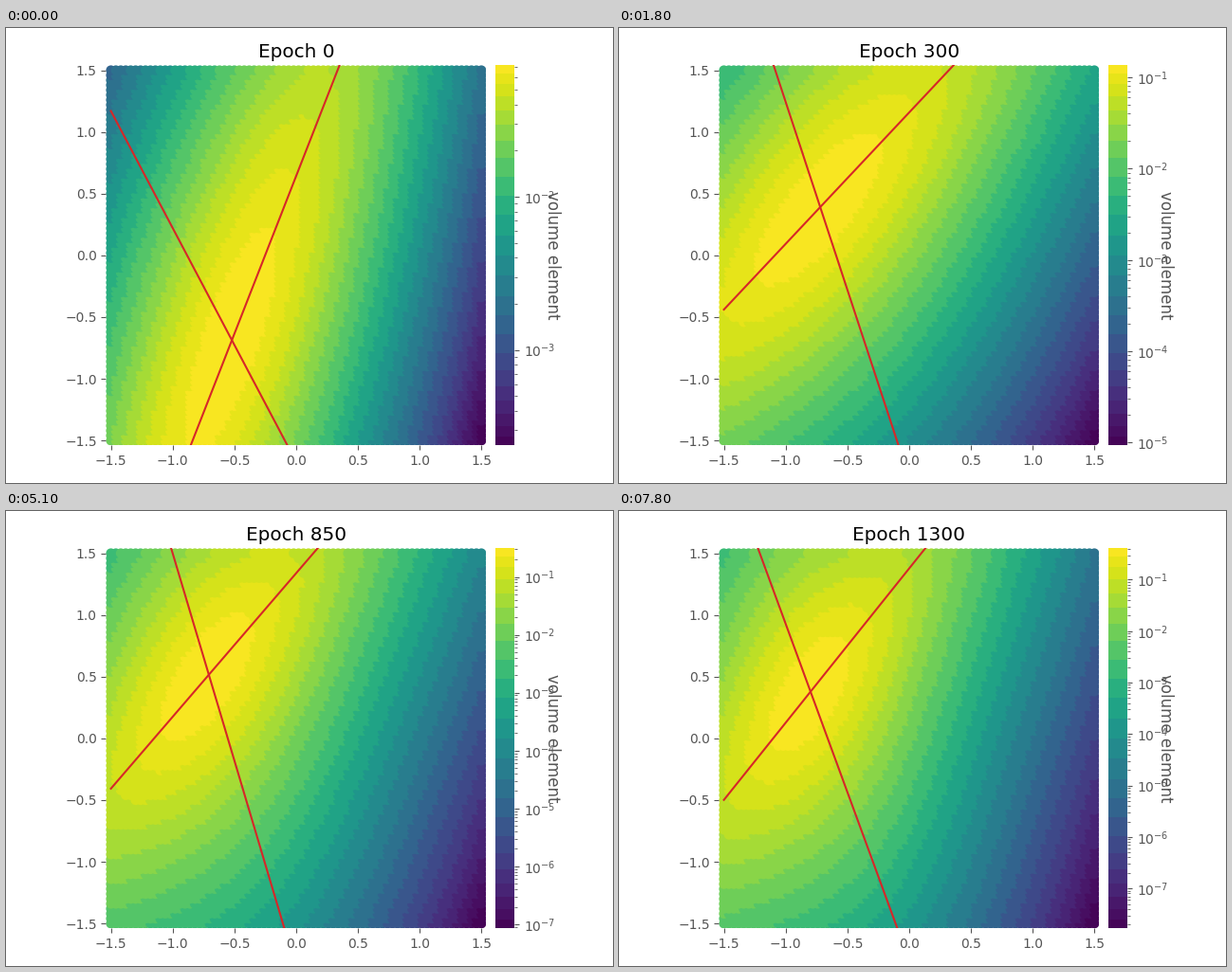
Animation, 640 px wide and 480 px high, one loop 8 s. Source, as a matplotlib script:

```python
import numpy as np
import matplotlib.pyplot as plt
from matplotlib.animation import FuncAnimation
from matplotlib.colors import ListedColormap, LogNorm

WIDTH, HEIGHT, DPI = 640, 480, 100
GREY = "#555555"
TICK_MS, HOLD_MS, LOOP_MS = 100, 300, 8000
EPOCH_STEP = 50
LIMIT = 1.54
BANDS = 24

plt.rcParams.update({
    "font.family": "DejaVu Sans", "font.size": 10,
    "axes.titlesize": 14.4, "axes.labelsize": 12,
    "axes.labelcolor": GREY, "xtick.color": GREY, "ytick.color": GREY,
})


def hidden_unit(sharpness, top, slope):
    """Weights (wx, wy, bias) of a unit whose zero line meets the top edge at x = top."""
    return sharpness / np.hypot(slope, 1) * np.array([slope, -1, LIMIT - slope * top])


def units_at(epoch):
    """Both hidden units: a fast transient followed by slow settling."""
    def decay(tau, power=1):
        return np.exp(-(epoch / tau) ** power)

    steep_top = -0.6 - 0.00048 * epoch - 1.095 * decay(277, 1.55)
    steep_bottom = -0.095 + 0.1 * np.exp(-((epoch - 130) / 110) ** 2)
    steep = hidden_unit(
        sharpness=3.3 - 3.24 * decay(584) + 0.94 * decay(124),
        top=steep_top,
        slope=2 * LIMIT / (steep_top - steep_bottom))
    rising = hidden_unit(
        sharpness=5.645 - 3.627 * decay(650) + 1.03 * decay(104),
        top=0.11 + 0.53 * decay(400) - 0.289 * decay(55),
        slope=1 + 0.25 * epoch / 1300 + 1.556 * decay(55))
    return np.array([steep, rising])


def sigmoid_slope(z):
    return 0.25 / np.cosh(z / 2) ** 2


def volume_element(units, x, y):
    density = abs(np.linalg.det(units[:, :2])) / 2
    for wx, wy, bias in units:
        density = density * sigmoid_slope(wx * x + wy * y + bias)
    return density


def banded_viridis(size=400):
    """Viridis in flat bands that narrow towards both ends."""
    u = np.linspace(0, 1, BANDS + 1)
    edges = (u + (1 - np.cos(np.pi * u)) / 2) / 2
    centers = (edges[:-1] + edges[1:]) / 2
    levels = (np.arange(size) + 0.5) / size
    return ListedColormap(plt.get_cmap("viridis")(centers[np.digitize(levels, edges) - 1]))


def pixel_axes(left, bottom, width, height):
    return fig.add_axes([left / WIDTH, bottom / HEIGHT, width / WIDTH, height / HEIGHT])


fig = plt.figure(figsize=(WIDTH / DPI, HEIGHT / DPI), dpi=DPI, facecolor="white")
ax = pixel_axes(105.4, 39.6, 401, 401)
cax = pixel_axes(516, 39.6, 20, 401)
ax.set(xlim=(-LIMIT, LIMIT), ylim=(-LIMIT, LIMIT))
ax.spines[:].set_visible(False)
ticks = np.linspace(-1.5, 1.5, 7)
ax.set_xticks(ticks)
ax.set_yticks(ticks)

side = np.linspace(-1.5, 1.5, 76)
grid_x, grid_y = (g.ravel() for g in np.meshgrid(side, side))
start = volume_element(units_at(0), grid_x, grid_y)
dots = ax.scatter(grid_x, grid_y, c=start, s=7.5 ** 2, linewidths=0,
                  cmap=banded_viridis(), norm=LogNorm(start.min(), start.max()))
ends = np.array([-1.5, 1.5])
lines = [ax.plot(ends, ends, color="tab:red", lw=1.5)[0] for _ in range(2)]
title = ax.set_title("Epoch 0")

bar = fig.colorbar(dots, cax=cax)
bar.outline.set_visible(False)
bar.set_label("volume element", rotation=270)


def draw(frame):
    epoch = frame * TICK_MS // HOLD_MS * EPOCH_STEP
    units = units_at(epoch)
    values = volume_element(units, grid_x, grid_y)
    dots.set_array(values)
    dots.set_clim(values.min(), values.max())
    for line, (wx, wy, bias) in zip(lines, units):
        line.set_ydata(-(wx * ends + bias) / wy)
    title.set_text(f"Epoch {epoch}")
    return dots, *lines, title


animation = FuncAnimation(fig, draw, frames=LOOP_MS // TICK_MS, interval=TICK_MS,
                          repeat=True, repeat_delay=0, blit=False)
plt.show()
```
